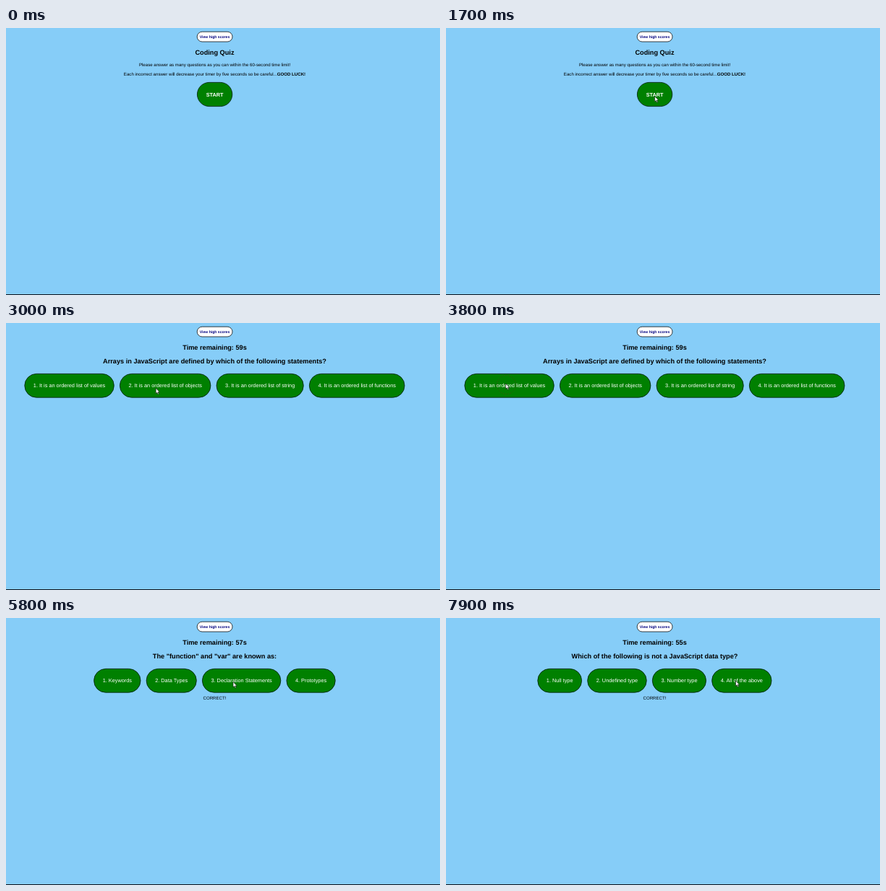
These frames come from a looping animation (600x370 px, 8000 ms). An HTML page:

```html
<!DOCTYPE html>
<html lang="en">
<head>
<meta charset="utf-8">
<title>Coding Quiz</title>
<style>
  html, body { margin: 0; width: 100%; height: 100%; overflow: hidden; background: #86cdf8; }
  svg { display: block; width: 600px; height: 370px; font-family: "Liberation Sans", Arial, sans-serif; text-rendering: geometricPrecision; }
  text { text-anchor: middle; }
  .head { font-size: 9.18px; font-weight: bold; }
  .body { font-size: 6.12px; }
  .label { font-size: 7.344px; fill: #fff; }
  .pill { fill: #008000; stroke: #001a08; stroke-width: .8; }
</style>
</head>
<body>
<svg viewBox="0 0 600 370">
  <rect y="369" width="600" height="1" fill="#0c1218"/>
  <rect x="264.2" y="5.2" width="48.8" height="13.8" rx="6.9" fill="#fff" stroke="#111" stroke-width=".8"/>
  <text x="288.5" y="13.9" font-size="5.1" font-weight="bold" fill="#000080">View high scores</text>
  <g id="intro">
    <text class="head" x="288.5" y="37.3">Coding Quiz</text>
    <text class="body" x="288.5" y="53.2">Please answer as many questions as you can within the 60-second time limit!</text>
    <text class="body" x="288.5" y="66">Each incorrect answer will decrease your timer by five seconds so be careful...<tspan font-weight="bold">GOOD LUCK!</tspan></text>
    <rect class="pill" x="264.4" y="75.4" width="48.4" height="33.2" rx="16.6"/>
    <text class="label" x="288.6" y="94.6" font-weight="bold">START</text>
  </g>
  <g id="quiz">
    <text id="timer" class="head" x="288.5" y="37.3"></text>
    <text id="result" class="body" x="288.5" y="112.7">CORRECT!</text>
  </g>
  <circle id="ring" cx="83.5" cy="85.5" r="13" fill="none" stroke="#7a2020" stroke-width=".8" stroke-dasharray="1 2.4" opacity=".8"/>
  <path id="cursor" d="M0 0V7.3L1.7 5.8 2.9 8.6 4.1 8.1 2.9 5.4H5.2Z" fill="#fff" stroke="#111" stroke-width=".6"/>
</svg>
<script>
const LOOP = 8000, CENTER = 288.4, PAD = 24.9, GAP = 7.3;
const $ = id => document.getElementById(id);

const questions = [
  { from: 1800, to: 3900, title: 'Arrays in JavaScript are defined by which of the following statements?',
    options: ['values', 'objects', 'string', 'functions'].map(s => 'It is an ordered list of ' + s) },
  { from: 3900, to: 6100, title: 'The "function" and "var" are known as:',
    options: ['Keywords', 'Data Types', 'Declaration Statements', 'Prototypes'] },
  { from: 6100, to: LOOP, title: 'Which of the following is not a JavaScript data type?',
    options: ['Null type', 'Undefined type', 'Number type', 'All of the above'] }
];

// Cursor stops: time, x, y
const path = [
  [1000, 294, 131], [1500, 289, 95], [1800, 288.5, 94.5], [2700, 288.5, 94.5], [3400, 83, 84],
  [3900, 82.5, 84], [4800, 82.5, 84], [5500, 314, 88.5], [6500, 314, 88.5], [7200, 400.5, 87], [LOOP, 400.5, 87]
];

function add(parent, name, attrs, text = '') {
  const el = document.createElementNS('http://www.w3.org/2000/svg', name);
  for (const key in attrs) el.setAttribute(key, attrs[key]);
  el.textContent = text;
  return parent.appendChild(el);
}

function build(question) {
  const group = question.group = add($('quiz'), 'g', {});
  add(group, 'text', { class: 'head', x: 288.5, y: 56.1 }, question.title);
  const buttons = question.options.map((option, i) => {
    const rect = add(group, 'rect', { class: 'pill', y: 70.4, height: 32.8, rx: 16.4 });
    const label = add(group, 'text', { class: 'label', y: 89.1 }, `${i + 1}. ${option}`);
    return { rect, label, width: label.getComputedTextLength() + PAD };
  });
  let x = CENTER - (buttons.reduce((sum, b) => sum + b.width + GAP, -GAP)) / 2;
  for (const { rect, label, width } of buttons) {
    rect.setAttribute('x', x + .4);
    rect.setAttribute('width', width - .8);
    label.setAttribute('x', x + width / 2);
    x += width + GAP;
  }
}

function cursorAt(t) {
  const i = Math.max(1, path.findIndex(stop => stop[0] > t));
  const [t0, x0, y0] = path[i - 1], [t1, x1, y1] = path[i];
  const u = Math.max(0, (t - t0) / (t1 - t0)), k = u * u * (3 - 2 * u);
  return [x0 + (x1 - x0) * k, y0 + (y1 - y0) * k];
}

const show = (el, on) => { el.style.display = on ? '' : 'none'; };

function draw(now) {
  const t = now % LOOP;
  show($('intro'), t < 1800);
  show($('quiz'), t >= 1800);
  for (const q of questions) show(q.group, t >= q.from && t < q.to);
  show($('result'), t >= 3900);
  show($('ring'), t >= 3750 && t < 3900);
  show($('cursor'), t >= 1000);
  $('timer').textContent = `Time remaining: ${60 - Math.max(0, Math.floor(t / 1000) - 2)}s`;
  $('cursor').setAttribute('transform', `translate(${cursorAt(t)})`);
  requestAnimationFrame(draw);
}

questions.forEach(build);
requestAnimationFrame(draw);
</script>
</body>
</html>
```
